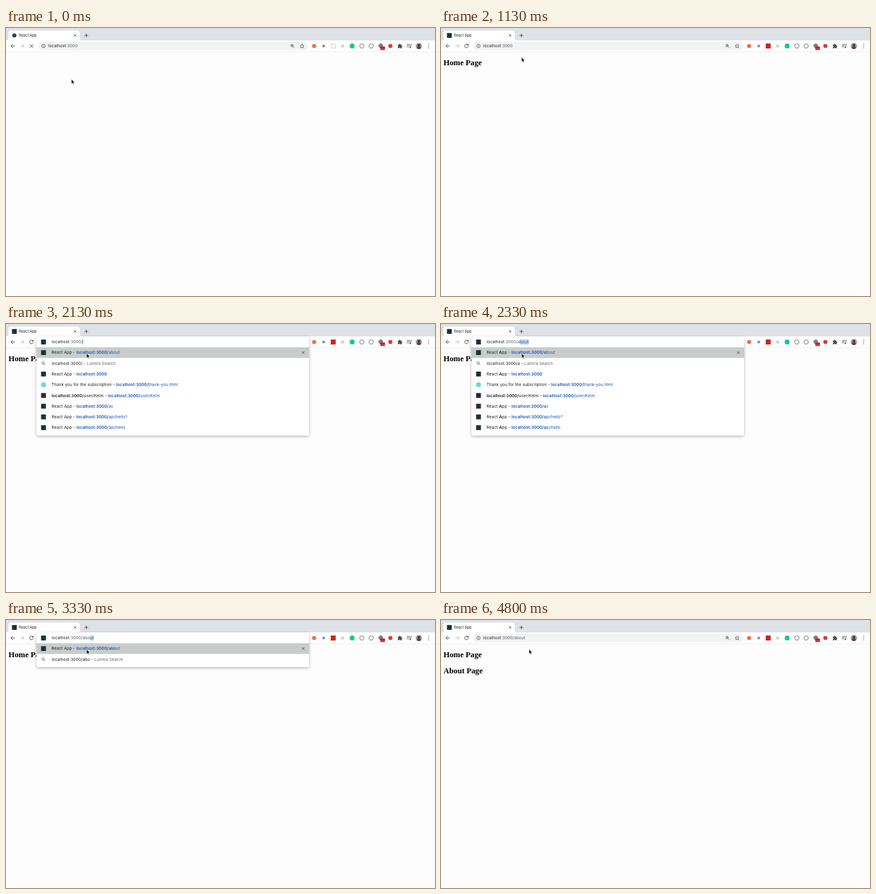
An HTML page that plays this animation: 692 px wide and 432 px high, repeating every 4.86 s.

```html
<!DOCTYPE html>
<html lang="en">
<head>
<meta charset="utf-8">
<title>Browser navigation</title>
<style>
  html, body { margin: 0; width: 100%; height: 100%; overflow: hidden; background: #fdfdfd; }
  svg { display: block; width: 692px; height: 432px; }
  text { white-space: pre; font: 6.73px Inter, "Open Sans", sans-serif; fill: #202124; }
  .head { font: bold 12.76px "Liberation Serif", Times, serif; fill: #000; }
  .tab { font-size: 5.8px; }
  .dim { fill: #5f6368; }
  .link { fill: #1a56c4; }
  .bold { font-weight: 600; }
  .line { fill: none; stroke: #5f6368; stroke-width: .9; }
  .dark { stroke: #3c4043; }
</style>
</head>
<body>
<svg viewBox="0 0 692 432">
  <defs>
    <filter id="shadow" x="-5%" y="-10%" width="110%" height="130%">
      <feDropShadow dx="0" dy="1.5" stdDeviation="2" flood-opacity=".3"/>
    </filter>
    <clipPath id="face"><circle cx="666" cy="29" r="5"/></clipPath>
  </defs>
  <rect width="692" height="432" fill="#fdfdfd"/>
  <g id="page">
    <text class="head" x="4" y="60">Home Page</text>
    <text class="head" id="about" x="4" y="85.6">About Page</text>
  </g>
  <rect width="692" height="20" fill="#dee1e6"/>
  <rect y="20" width="692" height="18" fill="#fff"/>
  <path d="M0 38.2H692" stroke="#e3e5e8" stroke-width=".7"/>
  <path d="M0 20Q4 20 4 16V8Q4 4 8 4H115Q119 4 119 8V16Q119 20 123 20Z" fill="#fff"/>
  <g id="tabIcon"></g>
  <text class="tab" x="21" y="14.1">React App</text>
  <path class="line dark" d="M109.7 10.2l3.6 3.6m0-3.6l-3.6 3.6M126.6 12h6m-3-3v6"/>
  <path class="line dark" d="M14 29H8m2.8-2.9L7.9 29l2.9 2.9"/>
  <path class="line" opacity=".45" d="M23 29h6m-2.8-2.9L29.1 29l-2.9 2.9"/>
  <g id="reload">
    <path class="line dark" d="M43.4 27A3 3 0 1 0 44 29.7"/>
    <path d="M44.4 25.2v3.1h-3.1z" fill="#3c4043"/>
  </g>
  <path id="stop" class="line dark" d="M38.4 26.2l5.6 5.6m0-5.6l-5.6 5.6"/>
  <g id="extensions"></g>
  <rect id="pill" x="52" y="22" width="435" height="14" rx="7" fill="#f1f3f4"/>
  <g id="barTools">
    <circle class="line" cx="60.5" cy="29" r="2.8" stroke-width=".7"/>
    <path class="line" d="M60.5 28.6v1.9m0-3.4v.8"/>
    <circle class="line" cx="461.5" cy="28.3" r="2"/>
    <path class="line" d="M463 29.8l2.4 2.4M460.5 28.3h2m-1-1v2"/>
    <path class="line" stroke-width=".7" d="M477.6 25.7l.9 2.2 2.4.2-1.8 1.6.5 2.4-2-1.3-2.1 1.3.6-2.4-1.9-1.6 2.5-.2z"/>
  </g>
  <g id="list"></g>
  <g id="field">
    <rect id="mark" y="24.8" height="8.4" fill="#b4d5fe"/>
    <g id="fieldIcon"></g>
    <text id="url" y="31.2"></text>
    <path id="caret" d="M0 25.2v7.6" stroke="#202124" stroke-width=".6"/>
  </g>
  <path id="pointer" d="M0 0V7.5L1.7 6L2.9 8.8L4.1 8.3L2.9 5.6H5.2Z" fill="#000" stroke="#fff" stroke-width=".6"/>
</svg>
<script>
const LOOP = 4860, STEP = 1000 / 15, HOST = 'localhost:3000';
const $ = id => document.getElementById(id);
const show = (id, on) => $(id).setAttribute('display', on ? 'inline' : 'none');
const put = (id, attrs) => Object.entries(attrs).forEach(([k, v]) => $(id).setAttribute(k, v));
const span = (cls, s) => `<tspan class="${cls}">${s}</tspan>`;
const dot = (x, y, r, fill) => `<circle cx="${x}" cy="${y}" r="${r}" fill="${fill}"/>`;
const box = (x, y, w, h, fill) => `<rect x="${x}" y="${y}" width="${w}" height="${h}" fill="${fill}"/>`;
const line = (d, w = .9) => `<path class="line" stroke-width="${w}" d="${d}"/>`;
const siteIcon = (x, y) => box(x - 3.9, y - 3.9, 7.8, 7.8, '#1d3036');
const ease = p => { p = Math.max(0, Math.min(1, p)); return p * p * (3 - 2 * p); };

function extensions(loading) {
  const ring = x => `<circle class="line" cx="${x}" cy="29" r="3.5" stroke-width=".8"/>`;
  return dot(497, 29, 3.3, '#ee7046') + dot(512.5, 29, 2.3, '#8b8e92') +
    (loading ? '<rect x="524.4" y="25.6" width="7" height="7" fill="#f8f8f8" stroke="#c9cbce" stroke-width=".7"/>'
             : box(523.8, 25, 8, 8, '#c8281f')) +
    dot(543, 29, 2.6, '#cfd1d4') + dot(558.3, 29, 3.9, '#15c39a') + ring(574) + ring(589) +
    dot(604.5, 28.6, 3.6, '#7b8185') + box(603.8, 29.8, 7.4, 5.6, '#d8141c') +
    [605.8, 607.5, 609.2].map(x => dot(x, 33, .45, '#fff')).join('') +
    dot(620, 29, 3.3, '#e23a3a') +
    '<path fill="#4a4e52" d="M632 26.7h1.9a1.2 1.2 0 0 1 2.4 0h1.7v1.8a1.2 1.2 0 0 1 0 2.4v1.9h-2a1.1 1.1 0 0 0-2.2 0H632v-2a1.1 1.1 0 0 0 0-2.2z"/>' +
    line('M646.5 26.4h5.3m-5.3 2h5.3m-5.3 2h3.2M653 31v-4.5h1.8') + dot(652, 31.2, 1.2, '#5f6368') +
    '<g clip-path="url(#face)">' + box(661, 24, 10, 10, '#a19a9c') + dot(666, 28, 2.3, '#493c40') +
    dot(666, 34.3, 4.2, '#5c3a42') + '</g>' +
    [26, 29, 32].map(y => dot(681.8, y, .8, '#5f6368')).join('');
}

// Suggestion rows for the letters typed after the slash.
function rows(typed) {
  const title = typed.length < 2 ? 'React ' + (typed ? span('bold', 'A') : 'A') + 'pp' : 'React App';
  const link = (path, hit = typed) => span('dim', ' – ') + span('link bold', HOST + '/' + hit) +
    span('link', path.slice(hit.length));
  const first = title + link('about');
  const search = HOST + '/' + typed + span('dim', ' – Lumtra Search');
  const home = title + span('dim', ' – ') + span('link bold', HOST);
  return [first, search, home,
    'Thank you for the subscription' + link('thank-you.html', ''),
    span('bold', HOST + '/') + 'user/Kelm' + link('user/Kelm', ''),
    title + link('av'), title + link('api/hello?'), title + link('api/hello')];
}

function list(typed, count) {
  const pitch = 17.28, height = 41.5 + (count - 2) * pitch + 14.5;
  let s = `<rect x="49" y="20" width="440" height="${height}" rx="4" fill="#fff" filter="url(#shadow)"/>` +
    box(49, 37.5, 440, 17.2, '#c8ccca');
  rows(typed).slice(0, count).forEach((row, i) => {
    const y = 46.1 + i * pitch;
    s += i === 1 ? `<circle class="line" cx="59.8" cy="${y - .7}" r="1.9"/>` + line(`M61.2 ${y + .7}l2.2 2.2`)
       : i === 3 ? dot(60.5, y, 3.9, '#66d9d9') : siteIcon(60.5, y);
    s += `<text x="73.5" y="${y + 2.3}">${row}</text>`;
  });
  return s + '<path class="line dark" d="M477.5 44.1l4 4m0-4l-4 4"/>';
}

function tabIcon(t) {
  const busy = t >= 3790 && t < 4060;
  if (busy) {
    const turn = (t - 3860) * .55;
    return `<path d="M11 10A3.3 3.3 0 0 1 13.5 8.7" transform="rotate(${turn} 13.5 12)" fill="none" stroke="#9aa0a6" stroke-width=".7"/>`;
  }
  return t < 460 || (t >= 4060 && t < 4260) ? dot(13.5, 12, 3.3, '#24464f') : siteIcon(13.5, 12);
}

// Latest entry whose start time has passed.
const at = (t, track) => track.filter(e => t >= e[0] - 7).pop()[1];
const typing = [[0, ''], [2260, 'a'], [2460, 'ab'], [3330, 'abo'], [3530, 'abou'], [3660, 'about']];
const sizes = [[0, 0], [2060, 8], [2460, 5], [2730, 4], [2860, 2], [3930, 0]];

function field(t, typed) {
  const focus = t >= 1525 && t < 3795, done = t >= 3795;
  const rest = done ? '/about' : t < 1995 ? '' : '/' + (typed ? 'about' : '');
  const x = focus ? 73.5 : 68;
  $('url').innerHTML = 'localhost' + span('dim', ':3000' + rest);
  put('url', { x });
  show('pill', !focus);
  show('barTools', !focus);
  show('fieldIcon', focus);
  const whole = HOST + rest, all = focus && t < 1725;
  const from = all ? 0 : HOST.length + 1 + typed.length;
  const left = from && focus && t >= 1995 ? $('url').getSubStringLength(0, from) : 0;
  const full = $('url').getComputedTextLength();
  const marked = focus && (all || (typed && from < whole.length));
  show('mark', marked);
  if (marked) put('mark', { x: x + left, width: full - left });
  show('caret', focus && !marked);
  put('caret', { transform: `translate(${x + full + .4} 0)` });
}

function draw(t) {
  const typed = at(t, typing), count = at(t, sizes);
  const blank = t < 260 || (t >= 3925 && t < 4125);
  const loading = t < 330 || (t >= 3795 && t < 4195);
  show('page', !blank);
  show('about', t >= 4125);
  show('reload', !loading);
  show('stop', loading);
  $('tabIcon').innerHTML = tabIcon(t);
  $('extensions').innerHTML = extensions(blank);
  $('list').innerHTML = count ? list(typed, count) : '';
  // The closing list fades behind the address bar.
  put('list', { opacity: t < 3795 ? 1 : t < 3860 ? .45 : .07 });
  field(t, typed);
  const p = ease((t - 733) / 400), q = ease((t - 4533) / 267);
  put('pointer', { transform: `translate(${105.5 + 24.5 * p + 12 * q} ${82.5 - 35.3 * p})` });
}

$('fieldIcon').innerHTML = siteIcon(60.5, 29);
let last = -1;
const start = performance.now();
function tick() {
  const t = (performance.now() - start) % LOOP;
  const step = Math.floor((t + 7) / STEP);
  if (step !== last) draw((last = step) * STEP);
  requestAnimationFrame(tick);
}
tick();
</script>
</body>
</html>
```
